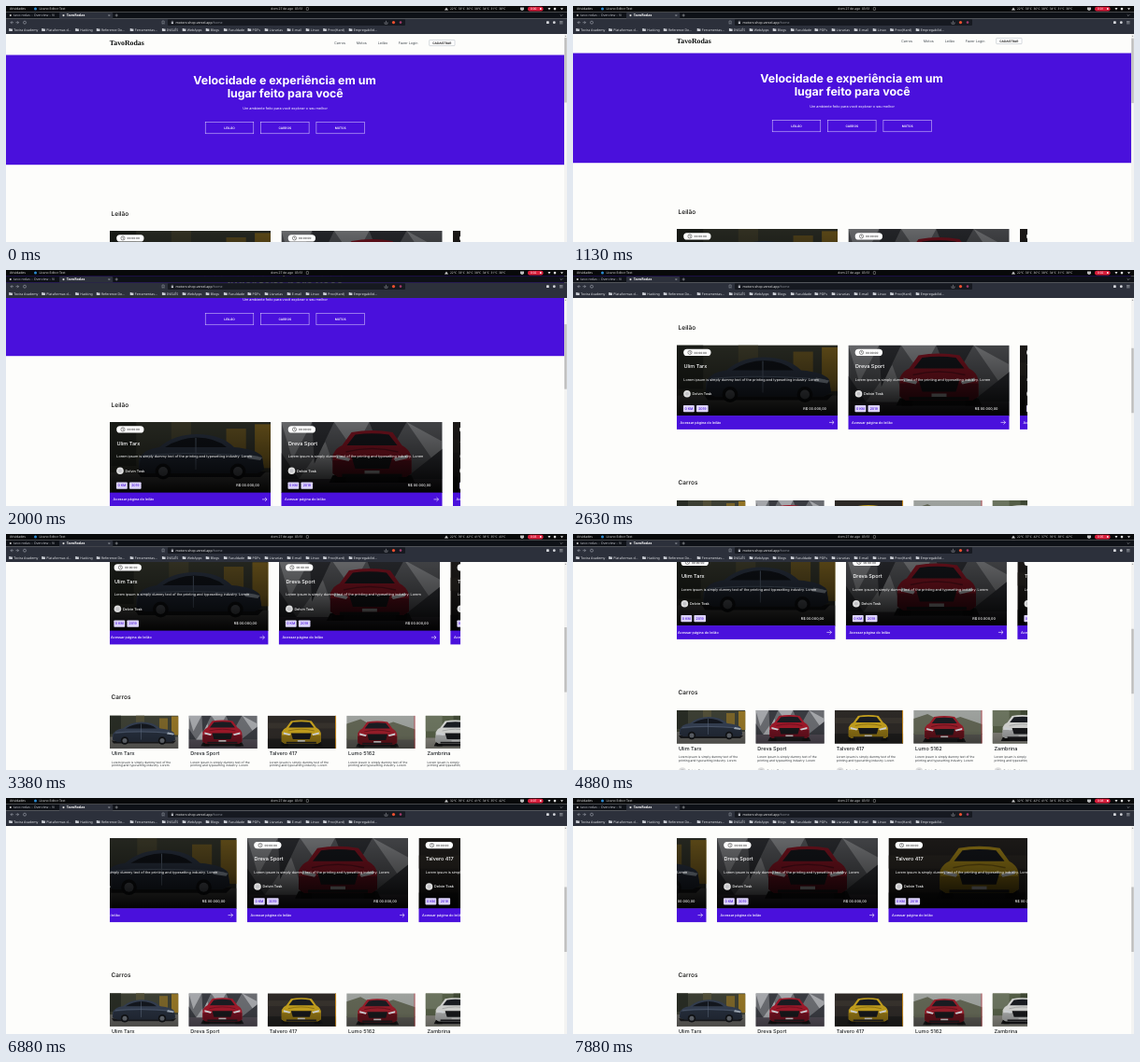
Recreate the animation shown at these times as an HTML page. Size 600 by 253 pixels, loop 8 s.

```html
<!DOCTYPE html>
<html lang="pt-BR">
<head>
<meta charset="utf-8">
<title>TavoRodas</title>
<style>
@property --y { syntax: '<number>'; inherits: true; initial-value: 0 }
@property --x { syntax: '<number>'; inherits: true; initial-value: 0 }
html, body { margin: 0; width: 100%; height: 100%; overflow: hidden; background: #fdfdfb }
svg { display: block }
#stage {
  position: absolute; left: 0; top: 0; width: 600px; height: 253px;
  font-family: Inter, sans-serif; text-rendering: geometricPrecision;
  animation: scroll 8s step-end infinite, slide 8s step-end infinite;
}
#page { transform: translateY(calc(var(--y) * -1px)) }
#thumb { transform: translateY(calc(var(--y) * .31px)) }
#track { transform: translateX(calc(var(--x) * -1px)) }
#bar { font-family: 'Noto Sans', sans-serif }
#timer { animation: tick 8s step-end infinite }
#temps { animation: temps 8s step-end infinite }
@keyframes scroll {
  0% { --y: 0 } 14.1% { --y: 2 } 15.6% { --y: 6 } 17.2% { --y: 14 }
  18.7% { --y: 25.3 } 20.3% { --y: 36 } 21.8% { --y: 48 } 23.4% { --y: 61 }
  25% { --y: 78 } 26.6% { --y: 98 } 28.1% { --y: 118 } 29.7% { --y: 135 }
  31.2% { --y: 149 } 32.8% { --y: 160.5 } 34.3% { --y: 170 } 40.6% { --y: 194 }
  42.2% { --y: 213 } 43.7% { --y: 220 } 45.3% { --y: 223 } 60.9% { --y: 218.5 }
  62.5% { --y: 212 } 64.1% { --y: 206 } 65.6% { --y: 201 } 67.2%, 100% { --y: 198.3 }
}
@keyframes slide {
  0% { --x: 0 } 36% { --x: 1.5 } 37.5% { --x: 2.6 } 76.6% { --x: 5 } 78.1% { --x: 8 }
  81.2% { --x: 13 } 82.8% { --x: 19 } 84.3% { --x: 27 } 85.9% { --x: 36.5 }
  87.5% { --x: 47 } 89.1% { --x: 58 } 92.2% { --x: 72 } 93.7% { --x: 87 }
  95.3% { --x: 104 } 96.8% { --x: 122 } 98.4%, 100% { --x: 140.5 }
}
@keyframes tick {
  0% { transform: none } 11% { transform: translateY(-6px) }
  23.5% { transform: translateY(-12px) } 36% { transform: translateY(-18px) }
  48.5% { transform: translateY(-24px) } 61% { transform: translateY(-30px) }
  73.5% { transform: translateY(-36px) } 86% { transform: translateY(-42px) }
  98.4%, 100% { transform: translateY(-48px) }
}
@keyframes temps {
  0% { transform: none } 36% { transform: translateY(-6px) }
  60.9% { transform: translateY(-12px) } 73.5%, 100% { transform: translateY(-18px) }
}
</style>
</head>
<body>
<svg id="stage" viewBox="0 0 600 253"></svg>
<script>
const VIOLET = '#4a10dc';
const LOREM = ['Lorem ipsum is simply dummy text of the', 'printing and typesetting industry. Lorem'];
const SELLER = 'Delvin Tosk';

const text = (x, y, s, size = 3.75, fill = '#fff', more = '') =>
  `<text x="${x}" y="${y}" font-size="${size}" fill="${fill}" ${more}>${s}</text>`;
const rect = (x, y, w, h, fill, more = '') =>
  `<rect x="${x}" y="${y}" width="${w}" height="${h}" fill="${fill}" ${more}/>`;
const disc = (x, y, r, fill, more = '') =>
  `<circle cx="${x}" cy="${y}" r="${r}" fill="${fill}" ${more}/>`;
const path = (d, fill, more = '') => `<path d="${d}" fill="${fill}" ${more}/>`;
const line = (d, stroke, w = .5) => path(d, 'none', `stroke="${stroke}" stroke-width="${w}"`);
const group = (move, s) => `<g transform="${move}">${s}</g>`;
const frame = (x, y, w, h, s) => `<svg x="${x}" y="${y}" width="${w}" height="${h}">${s}</svg>`;
const fade = (id, ...stops) => `<linearGradient id="${id}" x2="0" y2="1">` +
  stops.map(([at, alpha]) => `<stop offset="${at}" stop-opacity="${alpha}"/>`).join('') + '</linearGradient>';
const W5 = 'font-weight="500"', W6 = 'font-weight="600"', W7 = 'font-weight="700"';
const MID = ' text-anchor="middle"', END = ' text-anchor="end"';

// Cars and backdrops, in units of a 73.3 x 35.5 picture
const sedan =
  path('M4 30H68L71 27H2Z', '#1a1b1e') +
  path('M3 21Q5 15 14 14Q22 7 34 7Q47 7 54 14Q66 15 69 19L70 26L66 28H8L3 26Z', '#364154') +
  path('M4 20Q30 16 69 20L70 26L66 28H8L3 26Z', '#262e3c') +
  path('M17 14Q25 9 34 8.8Q44 9 50 14Z', '#14181f') +
  line('M33.5 9V26M6 18.5Q30 16 67 19', '#66758a', .5) +
  path('M62 18L69 19.5L68 21L61 20Z', '#aab6c4') +
  [16, 56].map(x => disc(x, 27, 4.2, '#121417') + disc(x, 27, 2.5, '#6a6f77')).join('');

const front = (paint, shade) =>
  path('M13 33H59L57 29H15Z', '#18181a') +
  rect(16, 25, 6, 8, '#111') + rect(50, 25, 6, 8, '#111') +
  path('M15 18Q17 14 20 13L25 6Q36 4 47 6L52 13Q56 15 57 19V28L54 30H18L15 28Z', paint) +
  path('M15 21H57V28L54 30H18L15 28Z', shade) +
  path('M22.5 13L27 7.3Q36 6 45 7.3L49.5 13Z', '#1b1e24') +
  line('M22 16.500Q36 13 50 16.500'.replace(/00/g, ''), shade, .8) +
  path('M25 19H47L45 25.5H27Z', '#17181b') +
  path('M17 18L24.5 20L23.5 21.5L17 20ZM55 18L47.5 20L48.5 21.5L55 20Z', '#dfe3e8') +
  rect(32, 26.5, 8, 1.8, '#cfcfcf') + rect(20, 28.3, 32, 1.7, '#1c1c1f');

const base = (top, floor, y) => rect(0, 0, 73.5, 36, top) + rect(0, y, 73.5, 36 - y, floor);
const cars = [
  { name: 'Ulim Tarx', car: sedan,
    back: base('#3f4236', '#6a6965', 23) + rect(0, 0, 12, 20, '#2a2e26') +
      rect(28, 0, 9, 16, '#55523a') + rect(53, 3, 9, 14, '#80692b') + rect(66, 1, 8, 20, '#9a7a28') },
  { name: 'Dreva Sport', car: front('#a81a2c', '#6f1120'),
    back: base('#707277', '#544e58', 26) +
      path('M0 0H14L5 17ZM24 0H40L33 13ZM57 0L73.5 9V24ZM8 26L20 9L26 26Z', '#aeb0b4') +
      path('M14 0H24L15 19ZM40 0H57L47 18ZM0 14L8 26H0ZM73.5 12V26H56Z', '#3c3e44') },
  { name: 'Talvero 417', car: front('#cfa91f', '#8f7214'),
    back: base('#2f2b28', '#1f1e1d', 25) + rect(0, 8, 73.5, 6, '#3a352f') + rect(72.3, 0, 1.2, 36, '#e39a1f') },
  { name: 'Lumo 5162', car: group('translate(-3 1)', front('#a01f2c', '#64121b')),
    back: base('#a6aaa6', '#5a5954', 25) +
      path('M0 9L15 4L32 13L50 7L73.5 15V26H0Z', '#666a58') + rect(72.5, 0, 1, 36, '#c22a35') },
  { name: 'Zambrina', car: group('translate(-4 0)', front('#dfe0dd', '#a9abab')),
    back: base('#59634a', '#8b8a82', 24) + rect(0, 0, 18, 17, '#717a64') + rect(30, 0, 14, 12, '#434c37') }
];

const avatar = (x, y) => disc(x, y, 3.8, '#dedede') + disc(x, y, 2, '#c4c4c8');
const tag = (x, w, s) => rect(x, 64.5, w, 7.2, '#dcd3fb', 'rx=".8"') +
  text(x + w / 2, 69.4, s, 3.6, VIOLET, W5 + MID);

const bigCard = (c, i) => group(`translate(${i * 183.5} 0)`,
  frame(0, 0, 172, 76,
    group('scale(2.35)', c.back) + group('translate(25 -1) scale(2)', c.car) +
    rect(0, 0, 172, 76, 'url(#shade)')) +
  rect(7.2, 4.2, 29.3, 7.4, '#fff', 'rx="3.7"') +
  disc(14, 7.9, 2.1, 'none', 'stroke="#222" stroke-width=".5"') + line('M14 6.6V8L15 8.6', '#222', .45) +
  text(18.5, 9, '00:00:00', 3, '#222', W5) +
  text(7.5, 24.6, c.name, 5.5, '#fff', W5) +
  text(7.3, 38.4, LOREM.join(' ')) +
  avatar(11, 52.3) + text(16.5, 53.6, SELLER, 3.75, '#fff', W5) +
  tag(7, 11.8, '0 KM') + tag(21, 12.6, '2019') +
  text(160, 69.4, 'R$ 00.000,00', 3.75, '#fff', W5 + END) +
  rect(0, 75.6, 172, 14.8, VIOLET) +
  text(3.6, 84.3, 'Acessar página do leilão', 3.75, '#fff', W5) +
  line('M163 82.9H168M166 80.9L168.1 82.9L166 84.9', '#fff', .6));

const smallCard = (c, i) => group(`translate(${i * 84.4} 0)`,
  frame(0, 0, 73.3, 35.5, c.back + c.car + rect(0, 0, 73.5, 36, 'url(#soft)')) +
  text(1.9, 42.6, c.name, 5.5, '#212529', W5) +
  LOREM.map((s, k) => text(1.9, 51 + k * 3.7, s, 3.28, '#30353a')).join('') +
  avatar(6, 65) + text(12, 66.3, SELLER, 3.28, '#40464c', W5));

const heroButton = (x, s) =>
  rect(x, 124.4, 51.6, 12.4, 'none', 'stroke="#e6ddff" stroke-width=".5"') +
  text(x + 25.8, 131.8, s, 3.28, '#fff', W6 + MID);

const page =
  rect(0, 0, 597, 520, '#fdfdfb') +
  text(110.8, 42, 'TavoRodas', 7.8, '#0b0d0d', `${W7} font-family="Liberation Serif, serif"`) +
  [[351, 'Carros'], [374.7, 'Motos'], [397.7, 'Leilão'], [419.8, 'Fazer Login']]
    .map(([x, s]) => text(x, 40.9, s, 3.75, '#495057')).join('') +
  rect(452.7, 36.4, 27.3, 6.2, '#fff', 'stroke="#adb5bd" stroke-width=".5" rx=".6"') +
  text(466.3, 40.7, 'CADASTRAR', 3.28, '#111', W6 + MID) +
  rect(0, 52.5, 597, 117.7, VIOLET) +
  text(298, 84, 'Velocidade e experiência em um', 12.4, '#fff', W7 + MID) +
  text(298.7, 98.4, 'lugar feito para você', 12.4, '#fff', W7 + MID) +
  text(298.5, 111.2, 'Um ambiente feito para você explorar o seu melhor', 3.75, '#fff', MID) +
  heroButton(213.2, 'LEILÃO') + heroButton(272.5, 'CARROS') + heroButton(331.9, 'MOTOS') +
  text(112.6, 224.6, 'Leilão', 6.6, '#111', W5) +
  frame(111, 241, 375, 92, `<g id="track">${cars.slice(0, 3).map(bigCard).join('')}</g>`) +
  text(112.6, 390.3, 'Carros', 6.5, '#111', W5) +
  frame(111, 407.5, 375, 72, cars.map(smallCard).join(''));

const marks = [[4, 'Tovira Academy'], [39, 'Plataformas d...'], [75, 'Hacking'], [97.6, 'Reference Do...'],
  [133.5, 'Ferramentas...'], [167.7, 'INGLÊS'], [189.5, 'WebApps'], [214.5, 'Blogs'], [233.7, 'Faculdade'],
  [259.3, 'PDFs'], [277.5, 'Livrarias'], [301.5, 'E-mail'], [321.5, 'Linux'], [340, 'Prov(Hard)'],
  [367.5, 'Empregabilid...']];
const folder = x => path(`M${x - .8} 23.9h1.3l.5 .6h1.9v2.6h-3.7z`, '#c9ccd3');

const readings = ['22 33 36 38 34 31 38', '22 39 42 41 38 35 43', '22 37 42 37 39 38 42', '32 39 42 41 34 35 42'];
const strip = (id, list, draw) => `<g id="${id}">${list.map((v, i) => draw(v, 4.2 + i * 6)).join('')}</g>`;

const desktop =
  rect(0, 0, 600, 6.4, '#08090a') +
  text(4, 4.3, 'Atividades', 3.5, '#dcdcdc') +
  disc(31.5, 3, 1.5, '#2b8ad0') + text(35.6, 4.3, 'Lirano Editor Text', 3.4, '#dcdcdc') +
  text(283.3, 4.3, 'dom 27 de ago&#160; 03:51', 3.4, '#dcdcdc') +
  rect(321.3, 1.5, 2.2, 3, 'none', 'stroke="#ccc" stroke-width=".4" rx=".6"') +
  path('M471 1.5L473 4.6H469Z', '#c9c9c9') +
  frame(474, 0, 66, 6, strip('temps', readings, (v, y) =>
    v.split(' ').map((n, i) => text(1 + i * 8.7, y, n + '°C', 3.2, '#dcdcdc')).join(''))) +
  path('M550 1.4h4v2q-.5 1-2 1.5q-1.5-.5-2-1.5z', '#bdbdbd') +
  rect(558, .8, 16.6, 4.6, '#d91e3c', 'rx="2.2"') +
  frame(561, 0, 9, 6, strip('timer', [0, 1, 2, 3, 4, 5, 6, 7, 8], (v, y) => text(0, y, '0:0' + v, 3.2))) +
  rect(571, 2.2, 1.6, 1.6, '#fff') +
  path('M579.5 2H582.5L581 4.5ZM593 2.3H596L594.5 4.3Z', '#ddd') + disc(587, 3.1, 1.3, '#ddd');

const tabs =
  rect(0, 6.4, 600, 7.2, '#0e1117') +
  disc(4.8, 10, 1, '#d0d0d0') + text(8, 11.3, 'tavo-rodas – Overview – Vi', 3.6, '#b7bac1') +
  path('M57 13.6V8.2Q57 7 58.2 7H113Q114.3 7 114.3 8.2V13.6Z', '#2c303b') +
  disc(61.5, 10.1, 1.1, '#d8d8d8') + text(64.7, 11.3, 'TavoRodas', 3.7, '#fff', W6) +
  line('M109.5 9.2L111.2 10.9M111.2 9.2L109.5 10.9M116.6 10H119.8M118.2 8.4V11.6' +
    'M592.7 9.3L594 10.6L595.3 9.3', '#d4d6db', .45);

const toolbar =
  rect(0, 13.6, 600, 16.4, '#2c303b') +
  line('M6.5 16.2L5 17.7L6.5 19.2M5 17.7H8M12 16.2L13.5 17.7L12 19.2M10.5 17.7H13.5', '#b9bdc6') +
  disc(20, 17.7, 1.5, 'none', 'stroke="#b9bdc6" stroke-width=".5"') +
  line('M167 16h2.2v3.3l-1.1-.8l-1.1 .8z', '#b9bdc6', .4) +
  rect(173, 14.3, 254, 6.6, '#161920', 'rx=".8"') +
  rect(176.8, 17.3, 2.2, 1.8, '#c9ccd3') +
  line('M177.2 17.3V16.2H178.6V17.3M405 17.2V19.2H408V17.2M406.5 18.3V15.8', '#c9ccd3', .4) +
  text(181.6, 18.9, 'motors-shop.vercel.app<tspan fill="#8d919a">/home</tspan>', 3.5, '#f1f1f1') +
  disc(414.5, 17.6, 1.6, '#f0502f') + disc(422, 17.6, 1.3, '#a03a6a') +
  rect(578, 16.3, 2.8, 2.8, '#d4d6db', 'rx=".6"') + disc(586.3, 17.7, 1.4, '#d4d6db') +
  line('M592 16.5H595.5M592 17.7H595.5M592 18.9H595.5', '#d4d6db', .45) +
  marks.map(([x, s]) => folder(x) + text(x + 4.3, 27, s, 3.55, '#e2e4e8')).join('');

document.getElementById('stage').innerHTML =
  `<defs>${fade('shade', [0, .42], [.5, .62], [1, .97])}${fade('soft', [0, .05], [.6, .1], [1, .3])}</defs>
  <g id="page">${page}</g>` +
  rect(597, 30, 3, 223, '#f3f3f2') + path('M597.7 32.8L598.5 31.5L599.3 32.8Z', '#888') +
  `<g id="thumb">${rect(597.3, 34, 2.4, 69.5, '#bdbdbd')}</g>` +
  `<g id="bar">${desktop + tabs + toolbar}</g>`;
</script>
</body>
</html>
```
